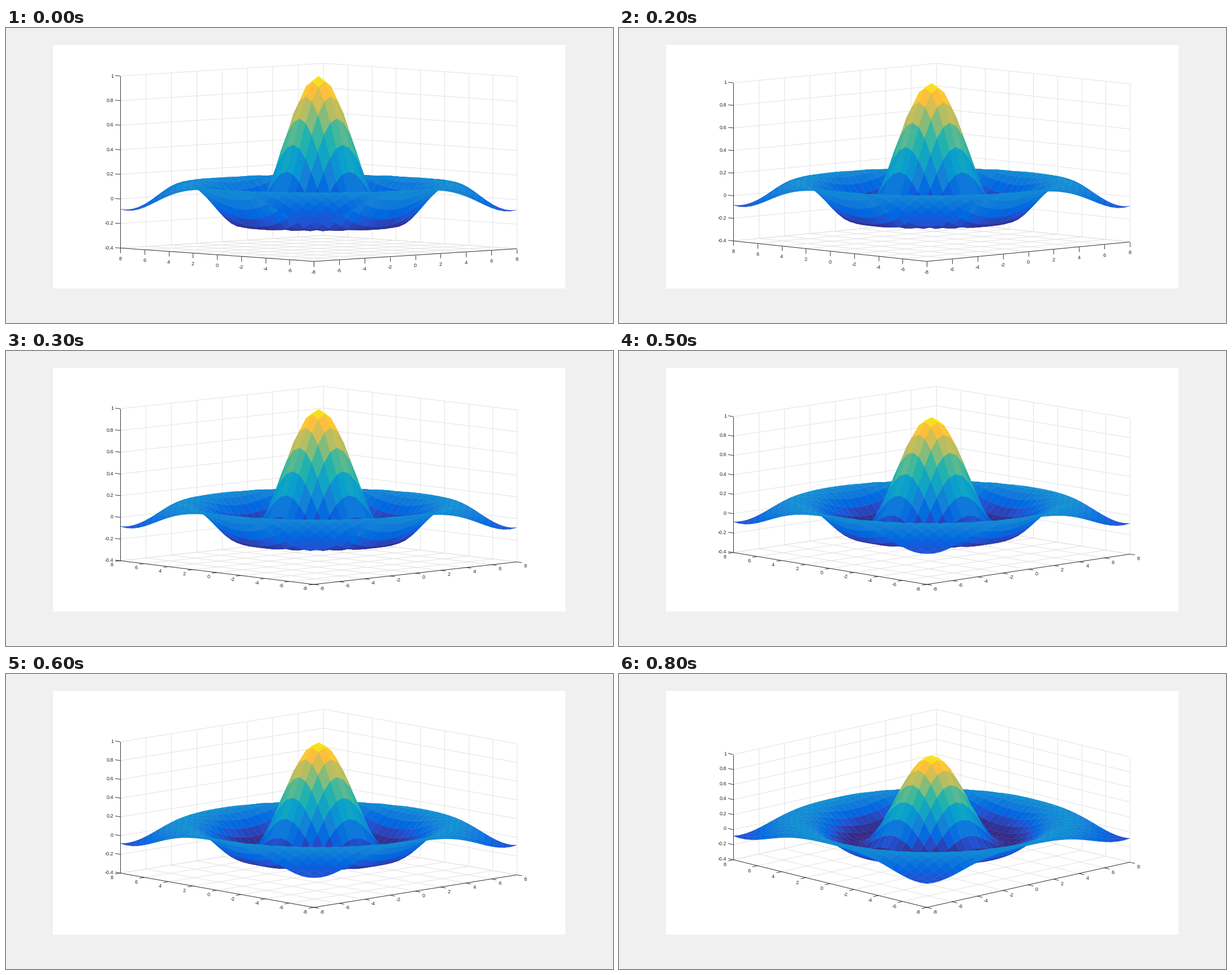
Recreate the animation shown at these times as a matplotlib script. Size 1073x522 px, loop 900 ms.

```python
import numpy as np
import matplotlib.pyplot as plt
from matplotlib.animation import FuncAnimation
from matplotlib.collections import LineCollection, PolyCollection
from matplotlib.colors import LinearSegmentedColormap
from matplotlib.patches import Rectangle

W, H, DPI = 1073, 522, 64
PX = 72 / DPI                      # points per pixel
INK = (0.15, 0.15, 0.15)
STEPS = 9

# Front corner, and the horizontal reach of the two floor axes
FRONT_X, FRONT_Y = 544, 413
RIGHT, LEFT = 359, 342
SPAN = 350.5                       # total height of the plot box
RATIO = 0.949                      # rise of the right axis against the left

# Key colours at their level out of 63
KEYS = {0: "#352a87", 6: "#2053d4", 9: "#0168e1", 15: "#1481d6",
        21: "#079dd0", 30: "#25b5aa", 42: "#a5be6b", 53: "#fdbe3d",
        60: "#f5e41d", 63: "#f9fb0e"}
CMAP = LinearSegmentedColormap.from_list(
    "heat", [(k / 63, c) for k, c in KEYS.items()], N=64)


def elevation(n):
    """Camera height in degrees: a slow climb that ends faster."""
    return np.interp(n, [0, 3, 4, 6, 8], [3, 6, 8, 10, 17])


class View:
    """Orthographic view of the box, stretched to a fixed height."""

    def __init__(self, degrees):
        q = 1.482 * np.tan(np.radians(degrees))
        self.height = SPAN / (1 + (1 + RATIO) * q)
        self.rise_left = self.height * q
        self.rise_right = RATIO * self.rise_left
        self.slope_left = self.rise_left / LEFT
        self.slope_right = self.rise_right / RIGHT

    def __call__(self, x, y, z):
        x, y, z = np.broadcast_arrays(x, y, z)
        u, v, w = (x + 8) / 16, (y + 8) / 16, (z + 0.4) / 1.4
        sx = FRONT_X + RIGHT * u - LEFT * v
        sy = (FRONT_Y - self.rise_right * u - self.rise_left * v
              - self.height * w)
        return np.stack([sx, sy], -1)


# Surface sin(r)/r, drawn back to front, each face coloured by its front corner
axis = np.linspace(-8, 8, 33)
X, Y = np.meshgrid(axis, axis, indexing="ij")
Z = np.sinc(np.hypot(X, Y) / np.pi)
I, J = np.divmod(np.arange(32 * 32), 32)
order = np.argsort(-(I + J), kind="stable")
I, J = I[order], J[order]
face_colors = CMAP(((Z - Z.min()) / (Z.max() - Z.min()))[I, J])

TICKS = np.arange(-8, 9, 2)
Z_TICKS = np.linspace(-0.4, 1, 8)


def grid_lines():
    """Pairs of 3D end points on the floor and the two back walls."""
    lines = []
    for t in TICKS:
        lines += [((t, -8, -.4), (t, 8, -.4)), ((-8, t, -.4), (8, t, -.4)),
                  ((t, 8, -.4), (t, 8, 1)), ((8, t, -.4), (8, t, 1))]
    for z in Z_TICKS:
        lines += [((-8, 8, z), (8, 8, z)), ((8, -8, z), (8, 8, z))]
    return np.array(lines, float)


GRID = grid_lines()

fig = plt.figure(figsize=(W / DPI, H / DPI), dpi=DPI, facecolor="#f0f0f0")
ax = fig.add_axes([0, 0, 1, 1])
ax.set_xlim(0, W)
ax.set_ylim(H, 0)
ax.axis("off")
ax.add_patch(Rectangle((83, 30), 906, 431, fc="white", ec="none"))

grid = LineCollection([], colors=["#e2e2e2"], linewidths=PX, zorder=2)
surface = PolyCollection([], facecolors=face_colors, edgecolors=face_colors,
                         linewidths=0.3 * PX, joinstyle="round", zorder=3)
frame_lines = LineCollection([], colors=[INK], linewidths=0.9 * PX, zorder=4)
for item in (grid, surface, frame_lines):
    ax.add_collection(item, autolim=False)


def make_labels(values, align):
    return [ax.text(0, 0, f"{v:g}", ha=align, va="baseline",
                    family="Liberation Sans", size=9 * PX, color=INK, zorder=5)
            for v in values]


left_labels = make_labels(TICKS, "center")
right_labels = make_labels(TICKS, "center")
z_labels = make_labels(np.round(Z_TICKS, 1) + 0.0, "right")


def update(n):
    degrees = elevation(n)
    view = View(degrees)

    P = view(X, Y, Z)
    surface.set_verts(np.stack(
        [P[I, J], P[I + 1, J], P[I + 1, J + 1], P[I, J + 1]], 1))
    grid.set_segments(view(GRID[..., 0], GRID[..., 1], GRID[..., 2]))

    # Floor ticks hang straight down while the view is almost level
    steep = degrees > 5.5
    if steep:
        left_tick = np.array([-9, 9 * view.slope_right])
        right_tick = np.array([9, 9 * view.slope_left])
        left_text = np.array([-15, 5.5 + 11 * view.slope_left])
        right_text = left_text * [-1, 1]
    else:
        left_tick = right_tick = np.array([0, 8.5])
        left_text = right_text = np.array([0, 18.5])
    z_tick = np.array([-9, -9 * view.slope_left])

    segments = []
    for points, tick, labels, shift in (
            (view(-8, TICKS, -0.4), left_tick, left_labels, left_text),
            (view(TICKS, -8, -0.4), right_tick, right_labels, right_text),
            (view(-8, 8, Z_TICKS), z_tick, z_labels, z_tick + [-3, 0])):
        segments.append(points[[0, -1]])
        for p, label in zip(points, labels):
            segments.append([p, p + tick])
            label.set_position(p + shift + [0, 3.2])
    right_labels[0].set_visible(steep)
    frame_lines.set_segments(segments)
    return [grid, surface, frame_lines]


anim = FuncAnimation(fig, update, frames=STEPS, interval=100,
                     repeat=True, repeat_delay=0, blit=False)
plt.show()
```
